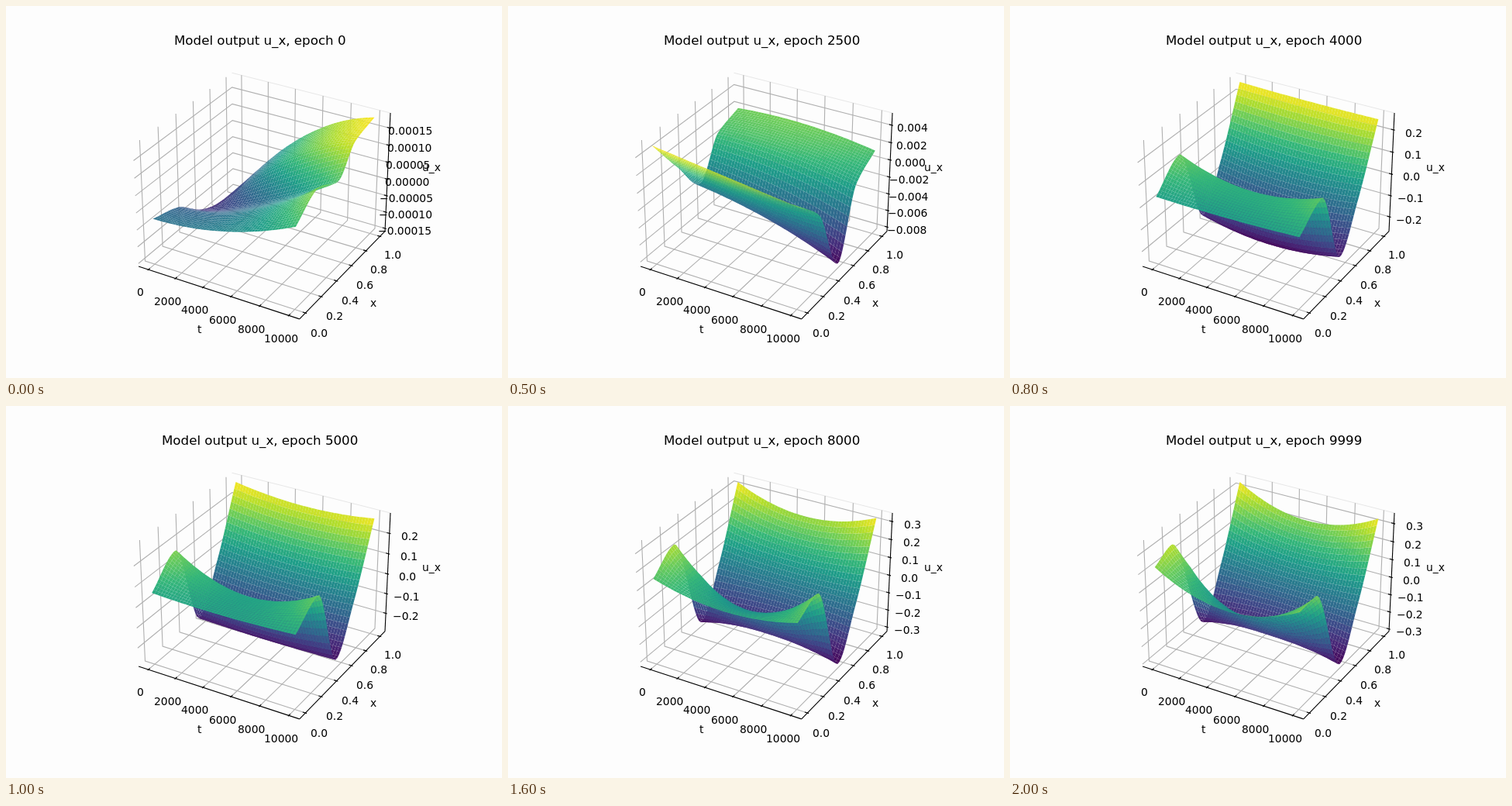
An HTML page with a canvas for the animation above (2.1 s loop, 640 by 480 pixels).

```html
<!DOCTYPE html>
<html lang="en">
<head>
<meta charset="utf-8">
<title>Model output</title>
<style>
html, body { margin: 0; width: 100%; height: 100%; overflow: hidden; background: #fdfdfd; }
canvas { display: block; }
</style>
</head>
<body>
<canvas id="stage" width="640" height="480"></canvas>
<script>
const ctx = document.getElementById('stage').getContext('2d');
const STEPS = 21, STEP_MS = 100, CELLS = 50;
const LO = -1 / 48, HI = 49 / 48;   // padded box limits
const LABEL_GAP = 0.0864, NAME_GAP = 0.1879;
const FONT = '"DejaVu Sans", Verdana, sans-serif';

// Key poses: z range, then four features along x (front edge, crest, dip, rear rim),
// each as relative height at the start, middle and end of t
const POSES = [
  { at: 0, range: [-.000152, .000186], edge: [.38, .456, .68], crest: [.31, .44, .83], dip: [.13, .38, .73], rim: [.01, .676, 1] },
  { at: 3, range: [-.000134, .000169], edge: [.445, .475, .64], crest: [.4, .42, .72], dip: [.23, .38, .64], rim: [.01, .66, 1] },
  { at: 5, range: [-.00825, .0051], edge: [1, .92, .84], crest: [.66, .59, .6], dip: [.37, .25, .02], rim: [.77, .785, .717] },
  { at: 8, range: [-.258, .264], edge: [.57, .57, .594], crest: [.77, .63, .745], dip: [.08, 0, .08], rim: [1, .985, .985] },
  { at: 13, range: [-.321, .324], edge: [.65, .62, .645], crest: [.855, .52, .8], dip: [.015, .11, .015], rim: [1, .88, 1] },
  { at: 20, range: [-.3, .344], edge: [.82, .63, .8], crest: [.9, .47, .81], dip: [.02, .11, .015], rim: [1, .815, .99] }
];

const VIRIDIS = ['440154', '482878', '3e4a89', '31688e', '26828e', '1f9e89', '35b779', '6dcd59', 'b4de2c', 'fde725']
  .map(hex => [0, 2, 4].map(i => parseInt(hex.slice(i, i + 2), 16)));

const clamp = v => Math.min(Math.max(v, 0), 1);
const mix = (a, b, k) => a + (b - a) * k;
const mixAll = (a, b, k) => a.map((v, i) => mix(v, b[i], k));
const padded = v => (v + .05) / 1.1;
const parabola = ([p, q, r], t) => p * (1 - t) * (1 - 2 * t) + q * 4 * t * (1 - t) + r * t * (2 * t - 1);

function color(v) {
  const p = clamp(v) * 9, i = Math.min(8, Math.floor(p));
  return `rgb(${mixAll(VIRIDIS[i], VIRIDIS[i + 1], p - i).map(Math.round)})`;
}

// Perspective view: elevation 30, azimuth -60, distance 10
function project([t, x, z]) {
  const a = (t - .5) * 8 / 7, b = (x - .5) * 8 / 7, c = (z - .5) * 6 / 7;
  const depth = 10 - (.4330127 * a - .75 * b + .5 * c);
  return [
    143.2 + 1997.84 * (.095 + (.8660254 * a + .5 * b) / depth),
    427.2 - 1997.84 * (.095 + (-.25 * a + .4330127 * b + .8660254 * c) / depth),
    depth
  ];
}

// Monotone cubic through a few points
function curve(points) {
  const last = points.length - 1;
  const slopes = points.slice(1).map(([x, y], i) => (y - points[i][1]) / (x - points[i][0]));
  const tangents = points.map((_, i) => {
    const p = slopes[Math.max(i - 1, 0)], q = slopes[Math.min(i, last - 1)];
    return p * q <= 0 ? 0 : 2 * p * q / (p + q);
  });
  return x => {
    let i = 0;
    while (i < last - 1 && x > points[i + 1][0]) i++;
    const [x0, y0] = points[i], [x1, y1] = points[i + 1];
    const h = x1 - x0, u = (x - x0) / h, v = 1 - u;
    return y0 * v * v * (1 + 2 * u) + y1 * u * u * (1 + 2 * v)
      + h * u * v * (tangents[i] * v - tangents[i + 1] * u);
  };
}

function poseAt(step) {
  let n = 0;
  while (n < POSES.length - 2 && step >= POSES[n + 1].at) n++;
  const a = POSES[n], b = POSES[n + 1], k = (step - a.at) / (b.at - a.at);
  const pose = { range: a.range.map((v, i) => v * (b.range[i] / v) ** k) };
  for (const part of ['edge', 'crest', 'dip', 'rim']) pose[part] = mixAll(a[part], b[part], k);
  pose.crestX = mix(.27, .19, clamp((step - 13) / 7));
  pose.bend = mix(.8, .39, clamp((step - 5) / 3));   // how far the rise has come at x = 0.75
  return pose;
}

function profile(pose, t) {
  const [edge, crest, dip, rim] = [pose.edge, pose.crest, pose.dip, pose.rim].map(f => parabola(f, t));
  return curve([[0, edge], [pose.crestX, crest], [.53, dip], [.75, mix(dip, rim, pose.bend)], [1, rim]]);
}

function line(style, ...points) {
  ctx.strokeStyle = style;
  ctx.beginPath();
  points.forEach(p => ctx.lineTo(...project(p).slice(0, 2)));
  ctx.stroke();
}

// Centred text on whole pixels
function write(text, x, y, size) {
  ctx.font = `${size}px ${FONT}`;
  ctx.fillStyle = '#000';
  ctx.fillText(text, Math.round(x - ctx.measureText(text).width / 2), Math.round(y));
}

function label(text, point, drop) {
  const [x, y] = project(point);
  write(text, x, y + drop, 13.89);
}

function zTicks([lo, hi]) {
  const rough = (hi - lo) / 9, power = 10 ** Math.floor(Math.log10(rough));
  const factor = [1, 2, 2.5, 5, 10].find(f => f * power >= rough), step = factor * power;
  const digits = Math.max(0, -Math.floor(Math.log10(step) + 1e-9)) + (factor === 2.5);
  const ticks = [];
  for (let k = Math.ceil(lo / step - 1e-6); k * step <= hi; k++) {
    const text = Math.abs(k * step).toFixed(digits);
    ticks.push([(k * step - lo) / (hi - lo), (k < 0 ? '\u2212' : '') + text]);
  }
  return ticks;
}

function drawAxes(range) {
  const sixths = [0, 1, 2, 3, 4, 5];
  const out = 1 / 120, inn = 1 / 60;
  const axes = [
    { name: 't', ticks: sixths.map(k => [padded(k / 5), String(k * 2000)]),
      grid: v => [[v, LO, LO], [v, HI, LO], [v, HI, HI]],
      tick: v => [[v, LO - out, LO], [v, LO + inn, LO]],
      place: (v, gap) => [v, LO - gap, LO - gap], ends: [[LO, LO, LO], [HI, LO, LO]] },
    { name: 'x', ticks: sixths.map(k => [padded(k / 5), (k / 5).toFixed(1)]),
      grid: v => [[HI, v, LO], [LO, v, LO], [LO, v, HI]],
      tick: v => [[HI + out, v, LO], [HI - inn, v, LO]],
      place: (v, gap) => [HI + gap, v, LO - gap], ends: [[HI, LO, LO], [HI, HI, LO]] },
    { name: 'u_x', ticks: zTicks(range),
      grid: v => [[LO, LO, v], [LO, HI, v], [HI, HI, v]],
      tick: v => [[HI + out, HI, v], [HI - inn, HI, v]],
      place: (v, gap) => [HI + gap, HI + gap, v], ends: [[HI, HI, LO], [HI, HI, HI]] }
  ];
  ctx.lineWidth = 1.11;
  line('#e8e8e8', [LO, HI, HI], [HI, HI, HI]);
  for (const axis of axes) for (const [v] of axis.ticks) line('#b0b0b0', ...axis.grid(v));
  for (const axis of axes) {
    line('#000', ...axis.ends);
    for (const [v, text] of axis.ticks) {
      line('#000', ...axis.tick(v));
      label(text, axis.place(v, LABEL_GAP), 12);
    }
    label(axis.name, axis.place(.5, NAME_GAP), 4);
  }
}

function drawSurface(pose) {
  const mesh = [], quads = [];
  for (let i = 0; i <= CELLS; i++) {
    const height = profile(pose, i / CELLS);
    mesh.push([]);
    for (let j = 0; j <= CELLS; j++) {
      const z = height(j / CELLS);
      const [x, y, depth] = project([padded(i / CELLS), padded(j / CELLS), z]);
      mesh[i].push({ x, y, depth, z });
    }
  }
  for (let i = 0; i < CELLS; i++) for (let j = 0; j < CELLS; j++) {
    const corners = [mesh[i][j], mesh[i + 1][j], mesh[i + 1][j + 1], mesh[i][j + 1]];
    const mean = key => corners.reduce((sum, c) => sum + c[key], 0) / 4;
    quads.push({ corners, depth: mean('depth'), z: mean('z') });
  }
  quads.sort((a, b) => b.depth - a.depth);
  for (const { corners, z } of quads) {
    ctx.fillStyle = color(z);
    ctx.beginPath();
    corners.forEach(c => ctx.lineTo(c.x, c.y));
    ctx.fill();
  }
}

function draw(step) {
  const pose = poseAt(step);
  ctx.fillStyle = '#fdfdfd';
  ctx.fillRect(0, 0, 640, 480);
  drawAxes(pose.range);
  drawSurface(pose);
  write(`Model output u_x, epoch ${Math.min(step * 500, 9999)}`, 328, 50, 16.67);
}

let shown = -1;
function tick() {
  const step = Math.floor(performance.now() / STEP_MS) % STEPS;
  if (step !== shown) draw(shown = step);
  requestAnimationFrame(tick);
}
tick();
</script>
</body>
</html>
```
